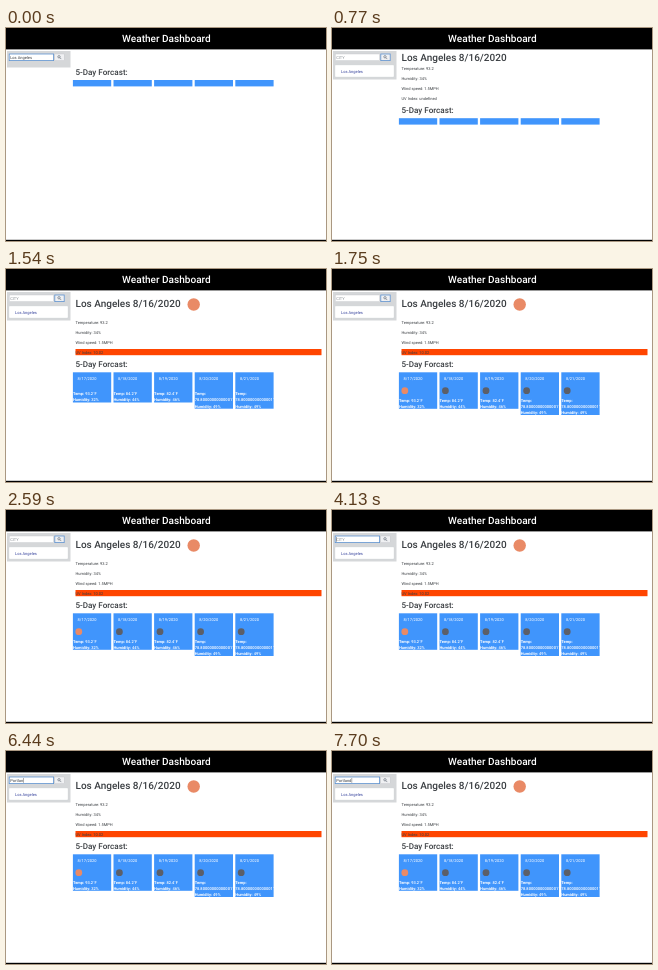
Animation of 320x213 px, one loop 8000 ms. Source, as an HTML page:

```html
<!DOCTYPE html>
<html lang="en">
<head>
<meta charset="utf-8">
<title>Weather Dashboard</title>
<style>
html, body { margin: 0; width: 100%; height: 100%; overflow: hidden; background: #fff; }
svg { display: block; width: 100%; height: 100%; }
text { font-family: Roboto, "Liberation Sans", sans-serif; text-rendering: geometricPrecision; white-space: pre; }
</style>
</head>
<body>
<svg id="stage" viewBox="0 0 320 213"></svg>
<script>
const LOOP = 8000;
const INK = '#3a3e42', BLUE = '#4095fc', SUN = '#e98a66', CLOUD = '#5c5f68';
const stage = document.getElementById('stage');

const SEARCH = 210, RESULT = 770, UV = 840, FORECAST = 980, ICON = 1540, CARD_ICONS = 1680, FOCUS = 4130;
const keyTimes = [5180, 5600, 5670, 5810, 6020, 6230, 6440, 6720];
const days = [
  ['93.2', 32], ['84.2', 44], ['82.4', 46],
  ['78.80000000000001', 49], ['78.80000000000001', 49]
];

const rect = (x, y, w, h, fill, extra = '') =>
  `<rect x="${x}" y="${y}" width="${w}" height="${h}" fill="${fill}" ${extra}/>`;
const text = (x, y, s, size = 4, fill = INK, weight = 400, extra = '') =>
  `<text x="${x}" y="${y}" font-size="${size}" fill="${fill}" font-weight="${weight}" ${extra}>${s}</text>`;
const dot = (x, y, r, fill) => `<circle cx="${x}" cy="${y}" r="${r}" fill="${fill}"/>`;
const bold = s => `<tspan font-weight="700">${s}</tspan>`;

function caretOn(t) {
  if (t < FOCUS) return false;
  if (t < 5180) return t < 4620;
  return t < 7280 || t >= 7700;
}

function sidebar(t) {
  const typed = t < SEARCH ? 'Los Angeles'
    : 'Portland'.slice(0, keyTimes.filter(k => t >= k).length);
  const onButton = t >= SEARCH && t < FOCUS;
  const edge = on => on ? 'stroke="#5f93d0" stroke-width=".8"' : 'stroke="#c0c4c8" stroke-width=".4"';
  let s = rect(1, 23, 63.5, t < RESULT ? 16.5 : 28.5, '#d5d7d9');
  s += rect(3.2, 26, 44.4, 6.6, '#fff', edge(!onButton));
  s += rect(48.8, 26, 9.4, 6.6, '#f0f1f3', edge(onButton));
  s += '<g fill="none" stroke="#56616e" stroke-width=".6"><circle cx="53" cy="28.8" r="1.2"/><path d="M53.9 29.7l1.4 1.4"/></g>';
  s += typed ? text(4.2, 30.7, typed) : text(4.2, 30.7, 'CITY', 4, '#8b9096');
  if (caretOn(t)) {
    const x = typed ? [7, 9.3, 10.6, 12, 12.9, 15.1, 17.3, 19.7][typed.length - 1] : 4.2;
    s += rect(x, 27, .4, 4.8, '#333');
  }
  if (t >= RESULT) {
    s += rect(3, 37, 59, 12, '#fff', 'rx=".8" stroke="#cfd2d5" stroke-width=".3"');
    s += text(9, 44.5, 'Los Angeles', 4, '#35429c');
  }
  return s;
}

function current(t) {
  const shift = t >= ICON ? 13 : 0;
  let s = text(69.5, t >= ICON ? 38 : 32.8, 'Los Angeles 8/16/2020', 10, INK, 500);
  if (t >= ICON) s += dot(187.7, 35.5, 6.2, SUN);
  ['Temperature: 93.2', 'Humidity: 34%', 'Wind speed: 1.5MPH'].forEach((line, i) => {
    s += text(69.5, 41.6 + 10 * i + shift, line);
  });
  if (t >= UV) s += rect(69.5, 67 + shift, 246, 6.2, '#ff4500');
  s += text(69.5, 71.6 + shift, t < UV ? 'UV Index: undefined' : 'UV Index: 10.02');
  return s;
}

function card(t, i, top) {
  const x = 66.9 + 40.6 * i, [temp, humidity] = days[i];
  const full = t >= FORECAST, long = temp.length > 5;
  const icon = t >= CARD_ICONS ? 6.3 : 0;
  const h = full ? 30.2 + icon + (long ? 6.2 : 0) : 6.4;
  let s = rect(x, top, 38.3, h, BLUE);
  if (!full) return s;
  const y = top + 23 + icon;
  const white = (dy, str) => text(x, y + dy, str, 4, '#fff', 500);
  s += text(x + 4.6, top + 7.8, `8/${17 + i}/2020`, 4, '#fff');
  if (icon) s += dot(x + 5.9, top + 18.4, 3.4, i ? CLOUD : SUN);
  s += white(0, bold('Temp:') + (long ? '' : ` ${temp}˚F`));
  if (long) s += white(6.1, `${temp}˚F`);
  return s + white(long ? 12.2 : 6.1, bold('Humidity:') + ` ${humidity}%`);
}

function draw(t) {
  const top = t < RESULT ? 52 : t < ICON ? 90.2 : 103.3;
  let s = rect(0, 0, 320, 213, '#fff') + rect(0, 0, 320, 21.4, '#000') + rect(0, 211.8, 320, 1.2, '#000');
  s += text(160.4, 13.6, 'Weather Dashboard', 10.05, '#fff', 500, 'text-anchor="middle"');
  s += sidebar(t);
  if (t >= RESULT) s += current(t);
  s += text(69.5, top - 5.3, '5-Day Forcast:', 8.1, INK, 500);
  return s + days.map((_, i) => card(t, i, top)).join('');
}

let shown = '';
function tick() {
  const next = draw(performance.now() % LOOP);
  if (next !== shown) stage.innerHTML = shown = next;
  requestAnimationFrame(tick);
}
tick();
</script>
</body>
</html>
```
